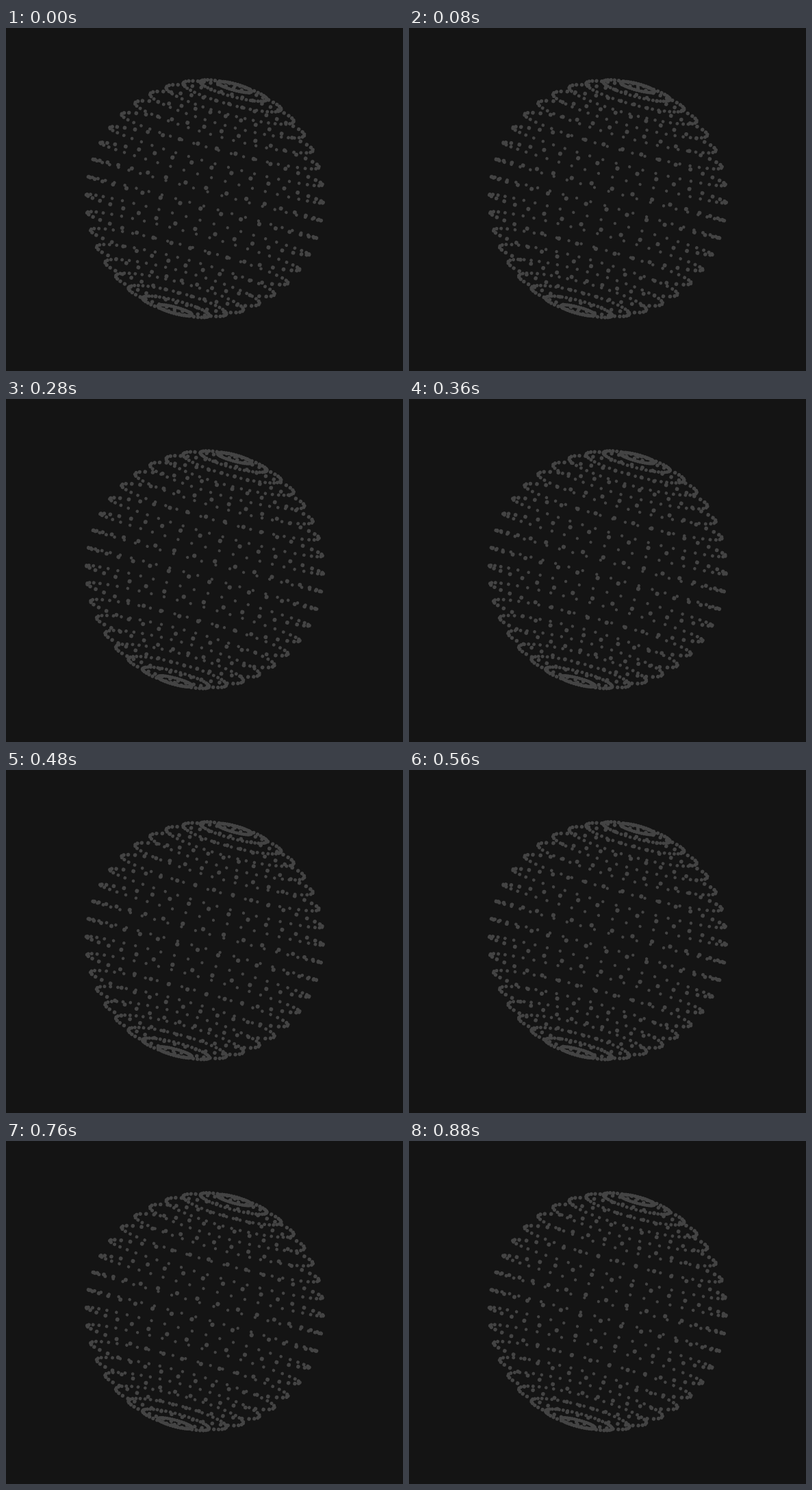
Recreate the animation shown at these times as an HTML page with a canvas. Size 580 by 500 pixels, loop 0.96 s.

```html
<!DOCTYPE html>
<html lang="en">
<head>
<meta charset="utf-8">
<title>Dotted globe</title>
<style>
  html, body { margin: 0; width: 100%; height: 100%; overflow: hidden; background: #141414; }
  canvas { display: block; }
</style>
</head>
<body>
<canvas id="stage" width="580" height="500"></canvas>
<script>
const ctx = document.getElementById('stage').getContext('2d');

const CENTER = { x: 290.4, y: 248.8 };
const RADIUS = 170.2;
const DEPTH = 0.185;             // sphere radius / camera distance
const DOT = 2.55;
const ROLL = Math.PI / 12;
const BANDS = 21;
const STEP = Math.PI / BANDS;    // spacing of dots in latitude and longitude
const PHASE = -0.07;

// The globe advances by two dot spacings per loop, in equal poses.
const HOLDS = [80, 80, 60, 80, 60, 60, 80, 60, 60, 60, 80, 60, 60, 80];
const LOOP = HOLDS.reduce((sum, hold) => sum + hold, 0);

function poseAt(ms) {
  let pose = 0;
  while (ms >= HOLDS[pose]) ms -= HOLDS[pose++];
  return pose;
}

function drawDot(polar, longitude) {
  const ring = Math.sin(polar);
  const scale = 1 / (1 - DEPTH * ring * Math.cos(longitude));
  const x = RADIUS * ring * Math.sin(longitude) * scale;
  const y = -RADIUS * Math.cos(polar) * scale;
  ctx.beginPath();
  ctx.arc(x, y, DOT * scale, 0, 2 * Math.PI);
  ctx.fill();
}

function draw(now) {
  const turn = PHASE + 2 * poseAt(now % LOOP) / HOLDS.length;
  ctx.setTransform(1, 0, 0, 1, 0, 0);
  ctx.fillStyle = '#141414';
  ctx.fillRect(0, 0, 580, 500);
  ctx.translate(CENTER.x, CENTER.y);
  ctx.rotate(ROLL);
  ctx.fillStyle = '#444';
  drawDot(0, 0);
  drawDot(Math.PI, 0);
  for (let band = 1; band < BANDS; band++) {
    for (let i = 0; i < 2 * BANDS; i++) drawDot(band * STEP, (i + turn) * STEP);
  }
}

const start = performance.now();
function tick() {
  draw(performance.now() - start);
  requestAnimationFrame(tick);
}
tick();
</script>
</body>
</html>
```
